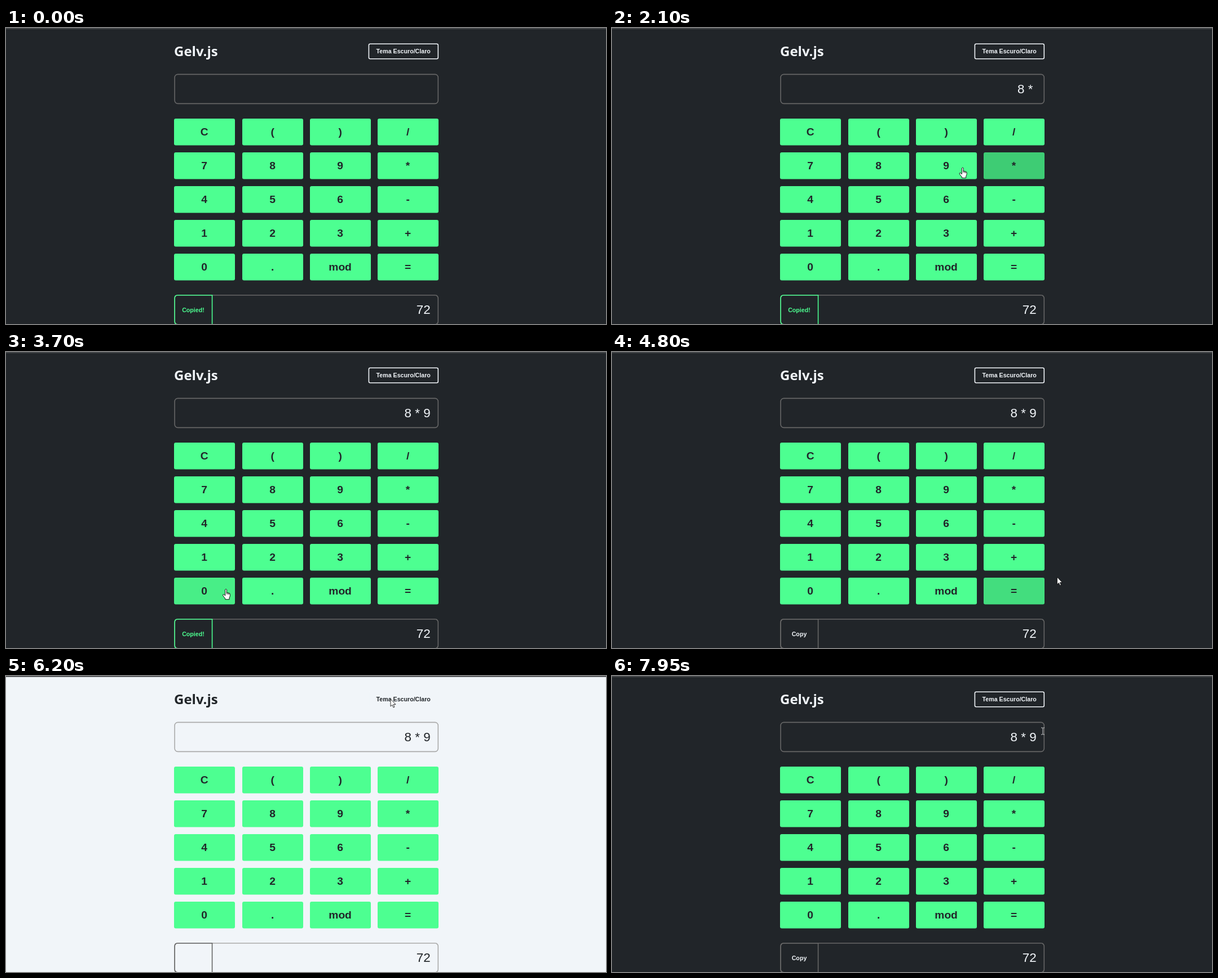
Recreate the animation shown at these times as an HTML page. Size 1064x526 px, loop 8000 ms.

```html
<!DOCTYPE html>
<html lang="pt">
<head>
<meta charset="utf-8">
<title>Gelv.js</title>
<style>
  html, body { margin: 0; width: 100%; height: 100%; overflow: hidden; background: #212529; }
  svg { display: block; width: 1064px; height: 526px; }
  text { font: 22.4px "Liberation Sans", Arial, sans-serif; }
  .key { font-size: 19.2px; font-weight: 700; text-anchor: middle; }
  .small { font-size: 10.67px; font-weight: 700; text-anchor: middle; }
  .title { font: 700 24px "Open Sans", "Noto Sans", sans-serif; }
  .out { text-anchor: end; }
</style>
</head>
<body>
<script>
const LOOP = 8000, STEP = 50, FADE = 150;
const DARK = [33, 37, 41], LIGHT = [241, 245, 249];
const MINT = [77, 255, 145], GREEN = [38, 131, 74];
const LINE_DARK = [102, 102, 102], LINE_LIGHT = [170, 170, 170];
const TO_LIGHT = 6200, TO_DARK = 7550, COPY_RESET = 4750;

const CURSORS = {
  arrow: '<path d="M0 0V13L3 10.3L5 15L7 14.1L5 9.6H9Z" fill="#fff" stroke="#000" stroke-width=".8"/>',
  hand: '<path d="M-1.3 1.2Q0-.8 1.3 1.2V6.5L6 7.6Q7.7 8 7.6 10.5Q7.6 13 6 16V18.7H-1.2V17Q-4 14-5.5 11.2' +
        'Q-5.4 9.3-3.6 9.9L-1.3 12Z" fill="#fff" stroke="#000" stroke-width=".9"/>' +
        '<path d="M1.3 6V9.5M3.5 7V10M5.6 7.6V10.5" stroke="#000" stroke-width=".8"/>',
  beam: '<path d="M-3-6H-.7L0-5.3L.7-6H3M0-5.3V5.3M-3 6H-.7L0 5.3L.7 6H3" fill="none" stroke="#d0d2d4"/>'
};

const clamp = v => Math.max(0, Math.min(1, v));
const lerp = (a, b, k) => a + (b - a) * k;
const mix = (a, b, k) => a.map((v, i) => lerp(v, b[i], k));
const smooth = k => k * k * (3 - 2 * k);
const rgb = c => `rgb(${c.map(Math.round)})`;

function add(tag, attrs, parent, text) {
  const el = document.createElementNS('http://www.w3.org/2000/svg', tag);
  for (const name in attrs) el.setAttribute(name, attrs[name]);
  if (text) el.textContent = text;
  return parent.appendChild(el);
}
const set = (el, fill, stroke) => {
  if (fill) el.setAttribute('fill', rgb(fill));
  if (stroke) el.setAttribute('stroke', rgb(stroke));
};

const svg = add('svg', { viewBox: '0 0 1064 526' }, document.body);
const page = add('rect', { width: 1064, height: 526 }, svg);
const edge = add('rect', { y: 1, width: 1064, height: 1 }, svg);
add('rect', { width: 1064, height: 1, fill: '#3c3e41' }, svg);
const title = add('text', { x: 298, y: 50, class: 'title' }, svg, 'Gelv.js');

const outline = (x, y, width, height, rx) =>
  add('rect', { x, y, width, height, rx, fill: 'none', 'stroke-width': 1.6 }, svg);
const themeBox = outline(643.4, 28.3, 122.9, 26.4, 2.4);
const themeText = add('text', { x: 704.7, y: 45, class: 'small' }, svg, 'Tema Escuro/Claro');
const boxes = [82.4, 474.8].map(y => outline(299.1, y, 467.2, 52, 5.6));
const entry = add('text', { x: 752.6, y: 116, class: 'out' }, svg);
const result = add('text', { x: 752.6, y: 508, class: 'out' }, svg, '72');
const copyBox = add('path', {
  d: 'M365.6 474.8V526.8H304.7Q299.1 526.8 299.1 521.2V480.4Q299.1 474.8 304.7 474.8Z',
  fill: 'none', 'stroke-width': 1.6
}, svg);
const copyText = add('text', { x: 332, y: 505, class: 'small' }, svg);

const keys = 'C ( ) / 7 8 9 * 4 5 6 - 1 2 3 + 0 . mod ='.split(' ').map((label, i) => {
  const x = Math.round(298.4 + (i % 4) * 120.3), y = 161 + Math.floor(i / 4) * 60;
  const width = 108, height = 47.4;
  return {
    label,
    zone: [x, y, width, height],
    box: add('rect', { x, y, width, height, rx: 3 }, svg),
    text: add('text', { x: x + 53.6, y: y + 30.4, class: 'key' }, svg, label)
  };
});
const themeKey = { zone: [642.6, 27.5, 124.5, 28] };
const pointer = add('g', {}, svg);

const onKey = label => {
  const [x, y, w, h] = keys.find(k => k.label === label).zone;
  return [x + w / 2, y + h / 2 + 3];
};

// Pointer moves: start, end, destination
const ENTER = 150, ORIGIN = [24, 1];
const MOVES = [
  [ENTER, 500, [420, 109]],
  [650, 1200, onKey('8')],
  [1400, 1750, onKey('*')],
  [1950, 2170, onKey('9')],
  [3300, 3700, [390, 421]],
  [3800, 4200, [345, 486]],
  [4400, 4866, [815, 395]],
  [4950, 5200, [773, 350]],
  [5250, 5750, [682, 41]],
  [6800, 6975, [870, 285]],
  [6975, 7170, [708, 43]],
  [TO_DARK, 7950, [764, 98]]
];
// Typed pieces and when they are clicked
const CLICKS = [[1350, '8'], [1900, ' * '], [2400, '9']];

const pointerAt = t => t < ENTER ? null : MOVES.reduce(
  (p, [from, to, goal]) => mix(p, goal, smooth(clamp((t - from) / (to - from)))), ORIGIN);
const inside = (p, [x, y, w, h]) => p && p[0] >= x && p[0] <= x + w && p[1] >= y && p[1] <= y + h;

// Hover strength of each button at every step of the loop
for (const key of [...keys, themeKey]) {
  key.hover = [0];
  for (let i = 1; i < LOOP / STEP; i++) {
    const dir = inside(pointerAt((i - 1) * STEP), key.zone) ? 1 : -1;
    key.hover[i] = clamp(key.hover[i - 1] + dir * STEP / FADE);
  }
}

function cursorKind(p) {
  if (keys.some(k => inside(p, k.zone)) || inside(p, [298, 474, 68, 53])) return 'hand';
  if (inside(p, [298, 82, 469, 53]) || inside(p, [366, 474, 401, 53])) return 'beam';
  return 'arrow';
}

function draw(t) {
  const step = t / STEP;
  const light = t >= TO_LIGHT && t < TO_DARK;
  const k = clamp((t - TO_LIGHT) / 200) - clamp((t - TO_DARK) / 200);
  const bg = light ? LIGHT : DARK, fg = light ? DARK : LIGHT;
  const softBg = mix(DARK, LIGHT, k), softFg = mix(LIGHT, DARK, k);

  set(page, bg);
  set(edge, light ? [126, 128, 131] : [72, 75, 78]);
  [title, entry, result].forEach(el => set(el, fg));
  boxes.forEach(el => set(el, null, light ? LINE_LIGHT : LINE_DARK));

  const h = themeKey.hover[step];
  set(themeBox, mix(softBg, softFg, h), softFg);
  set(themeText, mix(softFg, softBg, h));

  const copied = t < COPY_RESET;
  copyText.textContent = copied ? 'Copied!' : 'Copy';
  set(copyText, copied ? MINT : softFg);
  set(copyBox, null, copied ? MINT : mix(LINE_DARK, LINE_LIGHT, k));

  for (const key of keys) {
    const shade = 1 - 0.2 * key.hover[step];
    set(key.box, mix(MINT, GREEN, k).map(v => v * shade));
    set(key.text, softBg);
  }

  const typed = CLICKS.filter(c => c[0] <= t).map(c => c[1]).join('');
  entry.textContent = typed.replace(/ /g, '\u00a0');

  const p = pointerAt(t);
  pointer.innerHTML = p ? CURSORS[cursorKind(p)] : '';
  if (p) pointer.setAttribute('transform', `translate(${p[0].toFixed(1)} ${p[1].toFixed(1)})`);
}

const start = performance.now();
let last = -1;
function tick() {
  const t = Math.floor(((performance.now() - start) % LOOP) / STEP) * STEP;
  if (t !== last) draw(last = t);
  requestAnimationFrame(tick);
}
tick();
</script>
</body>
</html>
```
